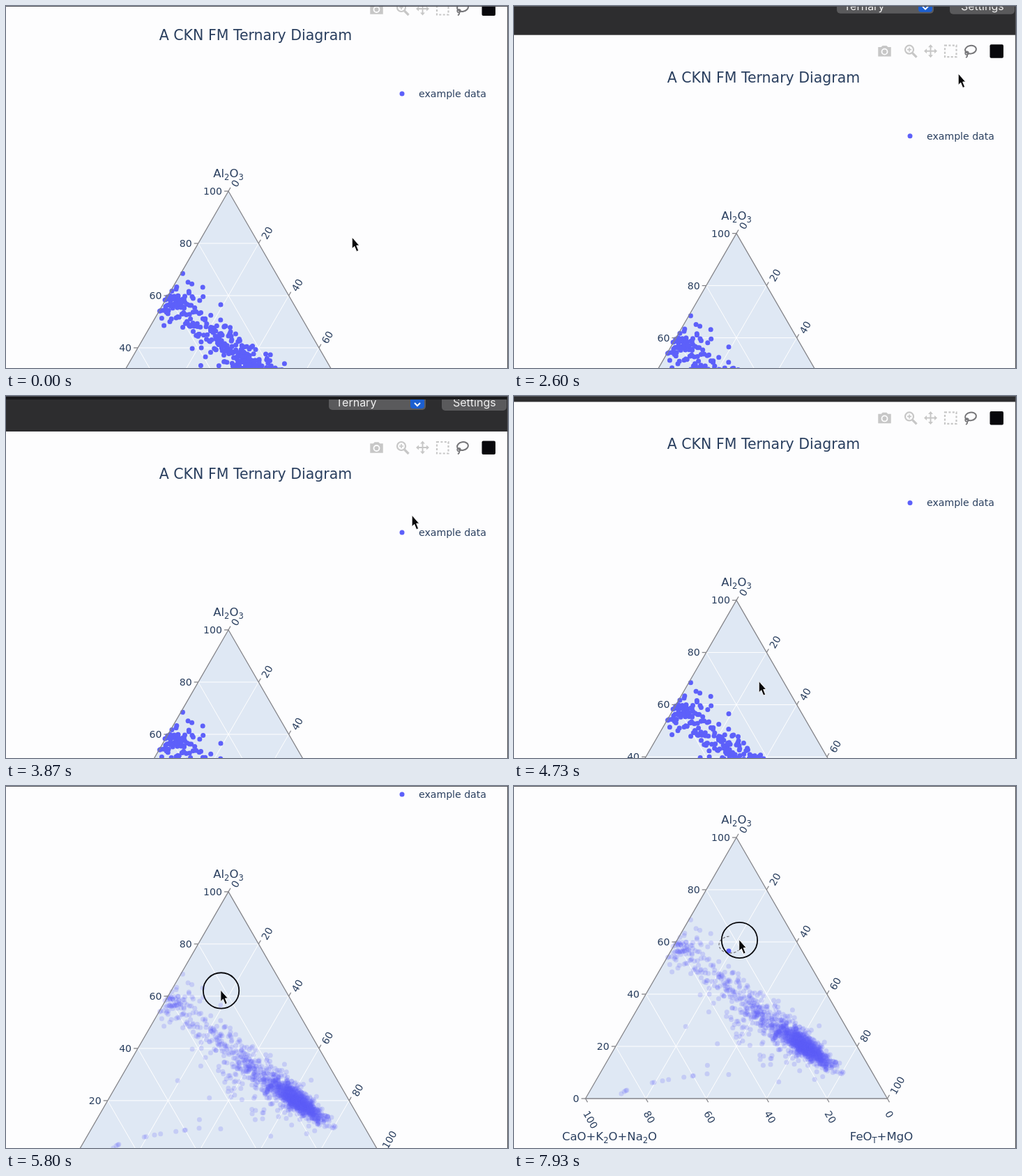
Recreate the animation shown at these times as an HTML page. Size 720x520 px, loop 8000 ms.

```html
<!DOCTYPE html>
<html lang="en">
<head>
<meta charset="utf-8">
<title>Ternary diagram</title>
<style>
  html, body { margin: 0; width: 100%; height: 100%; overflow: hidden; background: #fdfdfe; }
  svg { display: block; width: 720px; height: 520px; font: 14.1px "DejaVu Sans", Verdana, sans-serif; fill: #2a3f5f; }
  .title { font-size: 20.5px; text-anchor: middle; }
  .axis-title { font-size: 16.5px; text-anchor: middle; }
  .sub { font-size: 11.5px; }
  .ui { font: 16px Inter, "Liberation Sans", sans-serif; fill: #efefef; }
  .icon { fill: none; stroke: #c7c7c7; stroke-width: 2.2; }
  .solid { fill: #c7c7c7; }
  .grid { stroke: #fff; fill: none; }
  .frame { stroke: #85858a; stroke-width: 1.3; fill: none; }
  .dot { fill: #5d60fa; }
</style>
</head>
<body>
<svg viewBox="0 0 720 520">
  <rect width="720" height="520" fill="#fdfdfe"/>
  <!-- Page coordinates: y = 0 is the apex of the triangle -->
  <g id="page">
    <rect y="-400" width="720" height="115" fill="#2d2d2f"/>
    <rect x="463" y="-341" width="139" height="25" rx="5" fill="#5a5a5c"/>
    <text class="ui" x="473" y="-321">Ternary</text>
    <rect x="580" y="-337" width="20" height="19" rx="4" fill="#1c5fd0"/>
    <path d="M586-326l4 4 4-4" fill="none" stroke="#fff" stroke-width="2"/>
    <rect x="625" y="-341" width="93" height="26" rx="5" fill="#5a5a5c"/>
    <text class="ui" x="641" y="-321">Settings</text>
    <rect y="-400" width="720" height="69" fill="#1a1a1c"/>

    <g class="icon" transform="translate(0 -262)">
      <path class="solid" d="M523-5h4l2-2h5l2 2h4V7h-17z" stroke-width="1.5"/>
      <circle class="solid" cx="531.5" cy="1" r="4" stroke="#fdfdfe" stroke-width="1.8"/>
      <circle cx="567" cy="-2" r="6"/>
      <path d="M571.5 3l6 6" stroke-width="3.2"/>
      <path d="M564-2h6M567-5v6" stroke-width="1.6"/>
      <path d="M590 0h15M597.5-8v16" stroke-width="2"/>
      <path class="solid" d="M588 0l4-3.5v7zM607 0l-4-3.5v7zM597.5-9.5l-3.5 4h7zM597.5 9.5l-3.5-4h7z" stroke="none"/>
      <rect x="618" y="-8" width="16.5" height="16.5" stroke-dasharray="3 2.4"/>
      <g stroke="#757578" stroke-width="2">
        <ellipse cx="655" cy="-2" rx="8" ry="5.8" transform="rotate(-10 655 -2)"/>
        <circle cx="649.5" cy="3" r="2.3" stroke-width="1.6"/>
        <path d="M650 5q1 3-2 4.500" stroke-width="1.6"/>
      </g>
      <rect x="682.5" y="-9.5" width="19.5" height="19.5" rx="2" fill="#08080c" stroke="none"/>
    </g>

    <text class="title" x="358" y="-217">A CKN FM Ternary Diagram</text>
    <circle class="dot" cx="568" cy="-140" r="3.5"/>
    <text x="592" y="-135">example data</text>

    <path d="M319 0L535.5 375H102.500z" fill="#dfe8f4"/>
    <g id="grid" class="grid"></g>
    <g id="dots" class="dot"></g>
    <path class="frame" d="M319 0L535.5 375H102.500z"/>
    <g id="ticks"></g>

    <text class="axis-title" x="319" y="-20">Al<tspan class="sub" dy="4">2</tspan><tspan dy="-4">O</tspan><tspan class="sub" dy="4">3</tspan></text>
    <text class="axis-title" x="137" y="435">CaO+K<tspan class="sub" dy="4">2</tspan><tspan dy="-4">O+Na</tspan><tspan class="sub" dy="4">2</tspan><tspan dy="-4">O</tspan></text>
    <text class="axis-title" x="527" y="435">FeO<tspan class="sub" dy="4">T</tspan><tspan dy="-4">+MgO</tspan></text>

    <g id="tooltip">
      <rect x="563.5" y="-243" width="112.5" height="32.5" rx="2" fill="#69707f"/>
      <text x="575.5" y="-222" fill="#fff">Lasso Select</text>
    </g>
    <polyline id="lasso" fill="none" stroke="#66666a" stroke-width="1.1" stroke-dasharray="3.5 2.5"/>
    <g id="cursor">
      <circle id="press" r="25.7" fill="none" stroke="#08080c" stroke-width="1.8"/>
      <path d="M0-1V16.500l4-3.600 3.400 7.800 3.300-1.400-3.300-7.600H12z" transform="translate(-.7 0) scale(.88 .95)" fill="#08080a" stroke="#fff"/>
    </g>
  </g>
  <path d="M0 .5H719.5V520" fill="none" stroke="#55565c" stroke-width="1.2"/>
</svg>
<script>
const LOOP = 8000, PRESS = 5500, DRAG = 5800, SELECT = 7400;
const $ = id => document.getElementById(id);

function add(parent, tag, attrs, text) {
  const el = document.createElementNS("http://www.w3.org/2000/svg", tag);
  for (const k in attrs) el.setAttribute(k, attrs[k]);
  if (text !== undefined) el.textContent = text;
  return parent.appendChild(el);
}

// Axes: each step is 20 percent
const TOP_X = 319, BASE_Y = 375, HALF = 43.3;
const tick = d => add($("ticks"), "path", { d, class: "frame" });
const label = (attrs, n) => add($("ticks"), "text", attrs, n);
for (let i = 0; i <= 5; i++) {
  const y = i * BASE_Y / 5, left = TOP_X - i * HALF, right = TOP_X + i * HALF;
  const base = TOP_X + (5 - 2 * i) * HALF, mirror = 2 * TOP_X - base;
  if (i % 5) {
    add($("grid"), "path", { d: `M${left} ${y}H${right}L${mirror} ${BASE_Y}M${left} ${y}L${base} ${BASE_Y}` });
  }
  tick(`M${left} ${y}h-6`);
  tick(`M${right} ${y}l3-5.2`);
  tick(`M${base} ${BASE_Y}l3 5.2`);
  label({ x: left - 9, y: y + 5, "text-anchor": "end" }, 100 - 20 * i);
  label({ transform: `translate(${right} ${y}) rotate(-60)`, x: 10, y: 8 }, 20 * i);
  label({ transform: `translate(${base} ${BASE_Y}) rotate(60)`, x: 16.5, y: 14 }, 20 * i);
}

// Scatter: seeded clouds strung along one sloping spine
let seed = 71;
function random() {
  seed = (seed + 0x6D2B79F5) | 0;
  let t = Math.imul(seed ^ (seed >>> 15), 1 | seed);
  t = (t + Math.imul(t ^ (t >>> 7), 61 | t)) ^ t;
  return ((t ^ (t >>> 14)) >>> 0) / 4294967296;
}
const normal = () => Math.sqrt(-2 * Math.log(1 - random())) * Math.cos(2 * Math.PI * random());
const dot = (x, y) => add($("dots"), "circle", { cx: x.toFixed(1), cy: y.toFixed(1), r: 3.5 });
const inside = (x, y) => y > 112 && y < BASE_Y - 5 && Math.abs(x - TOP_X) < y * 0.577 + 1
  && Math.hypot(x - 310, y - 154) > 17;

// along(): 0 to 1 down the spine; across(): px to its lower left
function cloud(count, along, across) {
  while (count > 0) {
    const u = along(), v = across();
    const x = 238 + 212 * u - 0.62 * v, y = 158 + 168 * u + 0.78 * v;
    if (u < 1.1 && inside(x, y)) { dot(x, y); count--; }
  }
}
cloud(800, () => 0.86 + 0.08 * normal(), () => 6.5 * normal());
cloud(440, () => 0.85 * Math.sqrt(random()), () => 12 * normal());
cloud(75, () => 0.02 + 0.05 * normal(), () => 16 * normal());
cloud(85, () => 0.65 + 0.18 * normal(), () => 36 * Math.abs(normal()));
for (let i = 0; i < 12; i++) {
  const u = random();
  dot(152 + 130 * u, 372 - 33 * Math.sqrt(u));
}
const picked = dot(308, 163);

// Time in ms, then camera offset, or cursor tip on the page
const camera = [[0, 266], [2100, 266], [2750, 336], [3950, 336], [4730, 293.5], [DRAG, 152], [7150, 74], [LOOP, 74]];
const pointer = [[0, 497, 67], [2000, 526, -10], [2750, 650, -252], [3450, 650, -252],
  [4730, 352, 117], [PRESS, 309, 142], [DRAG, 309, 142]];

// Monotone cubic interpolation of column c
function at(keys, t, c) {
  let i = 0;
  while (i < keys.length - 2 && t > keys[i + 1][0]) i++;
  const slope = k => keys[k] && keys[k + 1] ? (keys[k + 1][c] - keys[k][c]) / (keys[k + 1][0] - keys[k][0]) : 0;
  const tangent = k => {
    const a = slope(k - 1), b = slope(k);
    return a * b > 0 ? 2 * a * b / (a + b) : 0;
  };
  const [a, b] = [keys[i], keys[i + 1]], h = b[0] - a[0];
  const u = (t - a[0]) / h, w = 1 - u;
  return a[c] * w * w * (1 + 2 * u) + b[c] * u * u * (3 - 2 * u)
    + h * u * w * (w * tangent(i) - u * tangent(i + 1));
}

// The drag runs anticlockwise round an ellipse, slowing slightly
function tip(t) {
  if (t < DRAG) return [at(pointer, t, 1), at(pointer, t, 2)];
  const p = (t - DRAG) / (LOOP - DRAG);
  const angle = -(95 + 305 * p * (1.25 - 0.25 * p)) * Math.PI / 180;
  return [310 + 16 * Math.cos(angle), 154 + 12 * Math.sin(angle)];
}
const show = (id, on) => $(id).setAttribute("visibility", on ? "visible" : "hidden");

function draw(t) {
  const dimmed = t >= PRESS;
  $("page").setAttribute("transform", `translate(0 ${at(camera, t, 1).toFixed(2)})`);
  $("cursor").setAttribute("transform", `translate(${tip(t)})`);
  show("tooltip", t > 2680 && t < 3520);
  show("press", dimmed);
  $("dots").setAttribute("fill-opacity", dimmed ? 0.2 : 1);
  picked.setAttribute("fill-opacity", dimmed && t < SELECT ? 0.2 : 1);
  const trail = [];
  for (let s = DRAG; s < t; s += 30) trail.push(tip(s).map(v => v.toFixed(1)));
  $("lasso").setAttribute("points", trail.join(" "));
}

const start = performance.now();
function frame() {
  draw((performance.now() - start) % LOOP);
  requestAnimationFrame(frame);
}
frame();
</script>
</body>
</html>
```
